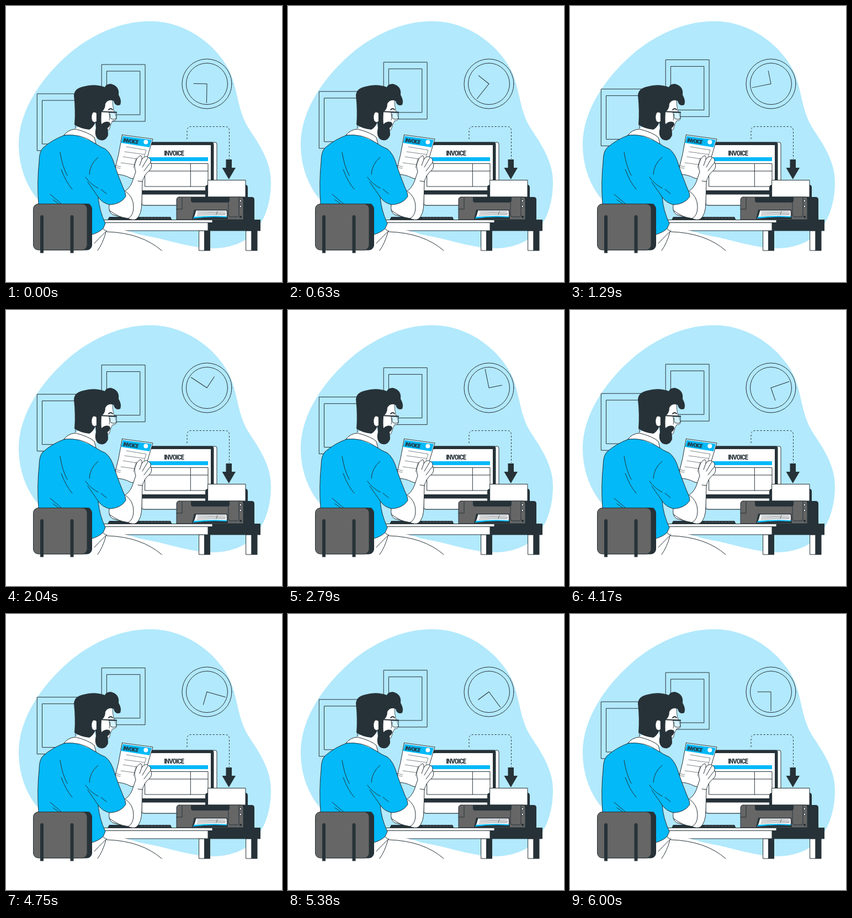
Write an HTML page that moves like this. It is 500x500 px and loops after 6040 ms.

```html
<!DOCTYPE html>
<html lang="en">
<head>
<meta charset="utf-8">
<title>Invoice printing</title>
<style>
  html, body { margin: 0; width: 100%; height: 100%; overflow: hidden; background: #fff; }
  svg { display: block; width: 100%; height: 100%; }
  .ink { fill: none; stroke: #263238; stroke-linecap: round; stroke-linejoin: round; }
  .white { fill: #fff; }
  .blue { fill: #03b9f8; }
  .dark { fill: #263238; }
  .grey { fill: #666; }
  .plain { stroke: none; }
  text { font-family: "Roboto Condensed", Roboto, "Liberation Sans", sans-serif; font-weight: 700; font-stretch: 75%; fill: #263238; stroke: none; }
</style>
</head>
<body>
<svg viewBox="0 0 500 500">
  <defs>
    <g id="picture">
      <rect width="78.5" height="103"/>
      <rect x="9.2" y="12" width="60" height="79"/>
    </g>
  </defs>

  <path fill="#b2e9fc" d="M262 27.5C325 28 380 69 404 116C421 152 418 184 438 219C456 247 480 279 480 319C480 356 469 389 449 411C431 431 400 439 375 439C338 438 310 429 281 422C230 410 155 402 98 382C50 359 23 306 23 251C23 188 66 126 122 80C166 46 215 27 262 27.5Z"/>

  <g class="ink">
    <!-- wall -->
    <g id="pictures">
      <use href="#picture" x="56.7" y="159"/>
      <use href="#picture" x="173.6" y="106"/>
    </g>
    <circle cx="364" cy="141" r="45"/>
    <circle cx="364" cy="141" r="37.5"/>
    <g id="hands"><path d="M340 141H364V175.5"/></g>
    <path stroke-dasharray="3 3" stroke-linecap="butt" d="M328 241V226Q328 218.5 335.500 218.500H397Q404.500 218.500 404.500 226V277"/>
    <path class="dark plain" d="M398.500 278H409V293H416L403.700 314L391.500 293H398.500Z"/>

    <!-- monitor -->
    <rect class="white" x="246" y="247" width="136" height="114" rx="3"/>
    <path class="dark" d="M246 250Q246 247 249 247H373Q376 247 376 250V341H246Z"/>
    <rect class="white plain" x="246" y="252" width="125" height="82"/>
    <path class="white" d="M246 341H376V358Q376 361 373 361H249Q246 361 246 358Z"/>
    <rect class="blue plain" x="256" y="274" width="110" height="7"/>
    <path d="M252 285.500H366V327H252ZM252 299H366M334.300 285.500V327"/>
    <text x="304" y="270.500" font-size="12.500" letter-spacing="-.95" text-anchor="middle">INVOICE</text>

    <!-- desk -->
    <path class="white" d="M350 407H360V443H350ZM435 407H445V443H435Z"/>
    <path class="dark plain" d="M359 407H370V443.500H359ZM444.500 407H455.500V443.500H444.500ZM365 387H461V407.500H365Z"/>
    <path class="white" d="M165 392H366V407H165Z"/>
    <path class="white" d="M165 387.500H374V392.500H165Z"/>
    <path class="dark plain" d="M187 382H298L300.500 387.500H184Z"/>
    <path class="plain" d="M244 384H298" style="stroke:#666" stroke-width="1" stroke-dasharray="4 2" stroke-linecap="butt"/>

    <!-- printer -->
    <path class="dark plain" d="M361 346V329Q361 324 366 324H434Q438 324 438 329V346Z"/>
    <path class="white" d="M366 315.500H434V346H366Z"/>
    <path class="dark plain" d="M410 346H445Q450 346 450 351V388H410Z"/>
    <path class="grey" d="M314 346H425Q430 346 430 351V387H309V351Q309 346 314 346Z"/>
    <path d="M319 347V368H309M403 356V378Q403 382 407 382H418Q422 382 422 378V347"/>
    <path class="dark plain" d="M335 346H405V352Q405 356 401 356H339Q335 356 335 352Z"/>
    <path class="dark plain" d="M337 386L341 369H401L402 386Z"/>
    <path class="white" d="M344 370H400Q401 378 400 383Q370 381 339 385Q342 379 344 370Z"/>
    <path class="blue plain" d="M340.500 382Q370 379 400.500 381L400 383Q370 381 339 385Z"/>
    <path stroke-width=".6" d="M347 373H397M347 376Q372 374 398 376M346 379Q372 377 397 378M383 372L381 378"/>
    <g class="white"><circle cx="425" cy="353" r="2"/><circle cx="425" cy="363" r="2"/></g>
    <ellipse class="dark plain" cx="425" cy="382" rx="2.500" ry="2"/>

    <!-- legs -->
    <path class="white plain" d="M152 416L180 402Q252 406 282 443H152Z"/>
    <path d="M176 404L183 409Q245 411 282 443M183 407Q176 413 160 430M181 410Q175 431 166 443"/>

    <!-- held sheet -->
    <path class="white" d="M210.500 233.500L266 241L245 310Q237 315 226 312Q211 304 195 305Q205 269 210.500 233.500Z"/>
    <path class="blue plain" d="M211.500 235.500L264 242.500L260 256L208.500 248Z"/>
    <circle class="white plain" cx="253.300" cy="246.500" r="4"/>
    <text transform="translate(211.500 246.300) rotate(8) skewX(-7)" font-size="10" letter-spacing="-.95">INVOICE</text>
    <path stroke-width=".6" d="M218 255L254 261L245 289L208 284M215 264L251 269M212 273L248 279M236 275L231 293M197 289L208 291M196 292L207 294"/>

    <!-- forearm and hand -->
    <path class="white" d="M211 338Q224 332 229 318L235 300Q231 290 235 282Q238 273 244 271Q247 272 246 278Q252 270 257 274Q263 276 262 283Q266 292 260 298Q251 304 247 318L246 356Q246 378 236 386Q230 389 221 385Q205 382 193 378Q185 373 187 360Z"/>
    <path d="M246 278L242 289M257 275L247 292M262 283L250 299M239 317L247 318M187 370Q205 384 221 385Q231 380 231 364Q231 346 217 336"/>

    <!-- shirt -->
    <path class="blue" d="M106 234Q84 242 67 257Q60 264 60 282Q56 320 59 359H152V415Q168 411 176 403L180 394Q169 371 167 346Q174 357 188 360Q208 359 217 345Q217 338 212 329Q203 307 197 289Q191 267 180 259Q170 255 160 248Q132 225 106 234Z"/>
    <path d="M98 265Q102 291 111 307M100 296Q108 318 120 332M167 274Q152 286 151 305M144 310Q153 323 167 330M148 319Q158 333 167 346M80 341L100 358M85 351L95 358M172 332L182 340"/>

    <!-- head -->
    <path class="white plain" d="M124 223L160 202L164 238L158 246L130 235Z"/>
    <path class="white" d="M105 234Q112 224 126 223Q150 229 160 238L163 250L158 247Q136 231 105 234Z"/>
    <path class="white" stroke-width=".8" d="M166 188L183 169H193Q193 181 195 188L200 203Q200 208 193 208L190 214L187 224L164 232Z"/>
    <path class="dark plain" d="M123 162Q124 149 140 146Q160 140 179 147Q181 141 190 141Q206 145 204 161Q210 171 207 179Q198 183 195 172Q185 168 180 177Q180 187 173 192Q172 207 173 214Q181 207 188 211Q191 216 184 221Q185 227 185 234Q180 247 168 242Q159 236 163 221L162 211Q158 220 151 224Q134 222 124 215Q126 190 123 162Z"/>
    <path class="white" stroke-width=".8" d="M164 194Q157 188 155 199Q154 210 161 211L164 209Z"/>
    <path d="M186 188Q190 184 193 188" stroke-width="1.800"/>
    <path fill="#b2e9fc" fill-opacity=".55" d="M187 193L200 193V204Q193 207 189 203Z"/>
    <path d="M166 191L200 192.500" stroke-width="2"/>
    <path d="M189 196L187 207" stroke-width=".8"/>

    <!-- chair -->
    <rect class="dark" x="58" y="358.500" width="97.500" height="83.500" rx="9"/>
    <rect class="grey" x="49.500" y="358.500" width="97.500" height="83.500" rx="9"/>
    <path class="dark plain" d="M62 447.500V382Q62 379 65 379Q68 379 68 382V447.500ZM116.500 447.500V382Q116.500 379 119.500 379Q122.500 379 122.500 382V447.500Z"/>
  </g>
</svg>
<script>
  const LOOP = 6040, FPS = 24, LIFT = 10, FLOAT_PERIOD = 3;
  const hands = document.getElementById("hands");
  const pictures = document.getElementById("pictures");

  function draw(ms) {
    const step = Math.floor((ms % LOOP) * FPS / 1000 + 0.1);
    const seconds = step / FPS;
    const phase = (seconds / FLOAT_PERIOD) % 1;
    const lift = LIFT * (1 - Math.abs(1 - 2 * phase));
    const turn = Math.min(360, 1 + seconds * 60);
    hands.setAttribute("transform", `rotate(${turn} 364 141)`);
    pictures.setAttribute("transform", `translate(0 ${-lift})`);
  }

  const start = performance.now();
  function tick() {
    draw(performance.now() - start);
    requestAnimationFrame(tick);
  }
  tick();
</script>
</body>
</html>
```
